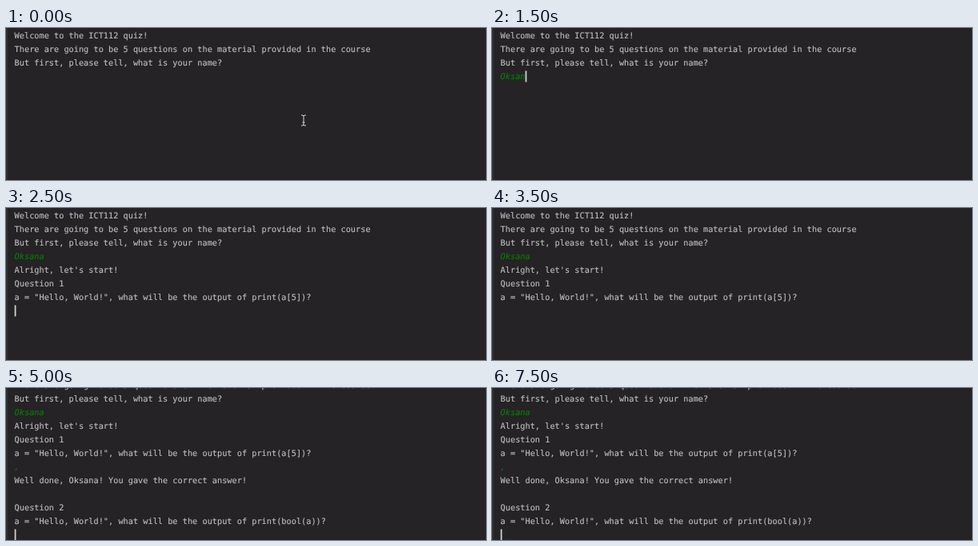
An HTML page that plays this animation: 600 by 190 pixels, repeating every 8000 ms.

```html
<!DOCTYPE html>
<html lang="en">
<head>
<meta charset="utf-8">
<title>Console quiz</title>
<style>
  html, body { margin: 0; width: 100%; height: 100%; overflow: hidden; background: #252325; }
  svg { display: block; width: 600px; height: 190px; }
  text {
    font: 10.27px "DejaVu Sans Mono", "Noto Sans Mono", monospace;
    fill: #bcbcbc;
    stroke: #bcbcbc;
    stroke-width: 0.15px;
    text-rendering: geometricPrecision;
  }
  .input { font-style: italic; fill: #087c08; stroke: #087c08; }
</style>
</head>
<body>
<svg viewBox="0 0 600 190">
  <rect width="600" height="190" fill="#252325"/>
  <rect width="2" height="190" fill="#303032"/>
  <g id="page"><rect id="caret" width="1.8" height="14" fill="#cfcfcf"/></g>
  <path id="beam" fill="none" stroke="#d8d8d8" d="M-3 -6.5H-1L0 -5.5L1 -6.5H3M0 -5.5V5.5M-3 6.5H-1L0 5.5L1 6.5H3M-1.5 2.5H1.5"/>
</svg>
<script>
const LOOP = 8000, LEFT = 10.6, CELL = 6.18, ROW = 17, VIEW = 191;
const HOLD = 1000, BLINK = 500;
const NAME = "Oksana";

// The session: text added to the console over time.
const session = [];
const print = (time, ...lines) => session.push({ time, text: lines.join("\n") + "\n" });
const type = (time, keys, gap = 0) =>
  [...keys].forEach((text, i) => session.push({ time: time + i * gap, text, typed: true }));

print(-1100,
  "Welcome to the ICT112 quiz!",
  "There are going to be 5 questions on the material provided in the course",
  "But first, please tell, what is your name?");
type(720, NAME.slice(0, -1), 195);
type(1900, NAME.slice(-1));
type(2300, "\n");
print(2500,
  "Alright, let's start!",
  "Question 1",
  'a = "Hello, World!", what will be the output of print(a[5])?');
type(4500, ",");
type(4800, "\n");
print(5000,
  `Well done, ${NAME}! You gave the correct answer!`,
  "",
  "Question 2",
  'a = "Hello, World!", what will be the output of print(bool(a))?');

const page = document.getElementById("page");
const caret = document.getElementById("caret");
const beam = document.getElementById("beam");
const rows = [];

const show = (el, on) => el.setAttribute("visibility", on ? "visible" : "hidden");
const move = (el, x, y) => el.setAttribute("transform", `translate(${x} ${y})`);

function addRow() {
  const el = document.createElementNS("http://www.w3.org/2000/svg", "text");
  el.setAttribute("x", LEFT);
  el.setAttribute("y", 13.2 + ROW * rows.length);
  page.insertBefore(el, caret);
  rows.push(el);
}

// Replay everything up to time t into lines of text.
function replay(past) {
  const lines = [{ text: "" }];
  for (const { text, typed } of past) {
    text.split("\n").forEach((part, i) => {
      if (i) lines.push({ text: "" });
      const line = lines.at(-1);
      line.text += part;
      if (part) line.typed = typed;
    });
  }
  return lines;
}

let drawn = 0;

function draw(t) {
  const past = session.filter(e => e.time <= t);
  if (past.length !== drawn) {
    drawn = past.length;
    const lines = replay(past);
    while (rows.length < lines.length) addRow();
    rows.forEach((el, i) => {
      el.textContent = lines[i]?.text ?? "";
      el.setAttribute("class", lines[i]?.typed ? "input" : "");
    });
    move(caret, LEFT + 0.1 + CELL * lines.at(-1).text.length, 2.5 + ROW * (lines.length - 1));
    move(page, 0, Math.min(0, VIEW - ROW * lines.length));
  }

  // The caret stays lit after a change, then blinks.
  const idle = t - past.at(-1).time;
  show(caret, idle < HOLD || Math.floor((idle - HOLD) / BLINK) % 2);

  if (t < 100) move(beam, 372, 115.5);
  else move(beam, 368, 102);
  show(beam, t < 700);
}

const start = performance.now();
function tick() {
  draw((performance.now() - start) % LOOP);
  requestAnimationFrame(tick);
}
tick();
</script>
</body>
</html>
```
